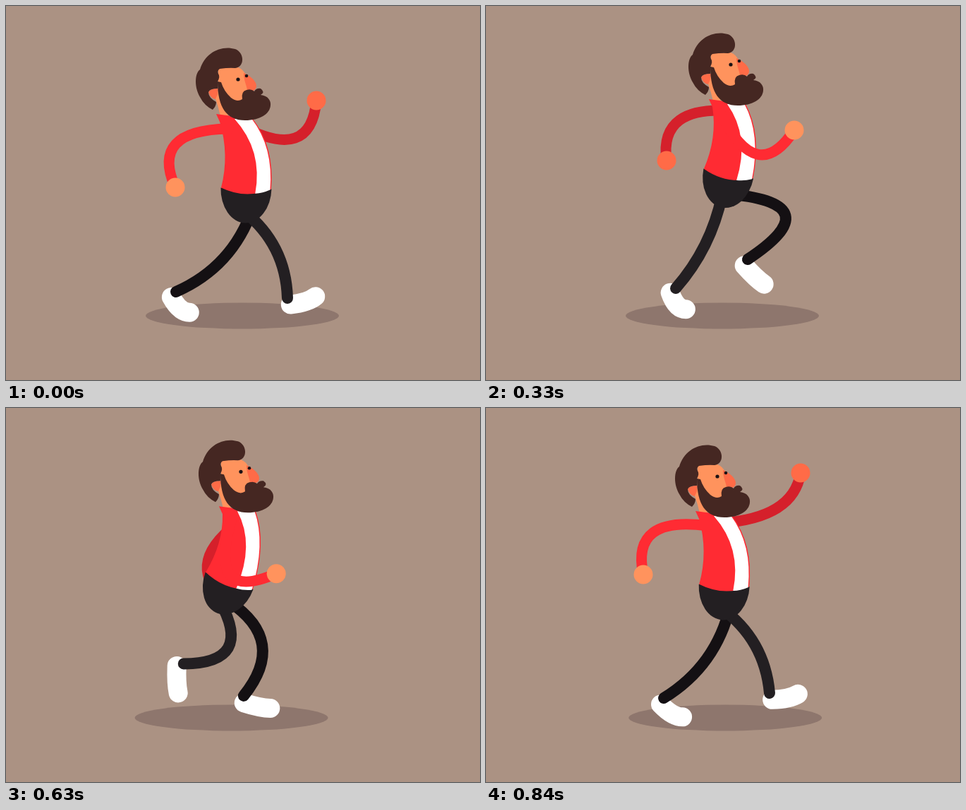
These frames come from a looping animation (672 px wide and 530 px high, 870 ms). An HTML page with a canvas:

```html
<!DOCTYPE html>
<html lang="en">
<head>
<meta charset="utf-8">
<title>Walk cycle</title>
<style>
html, body { margin: 0; width: 672px; height: 530px; overflow: hidden; background: #ab9283; }
canvas { display: block; }
</style>
</head>
<body>
<canvas id="stage" width="672" height="530"></canvas>
<script>
const ctx = document.getElementById('stage').getContext('2d');
const LOOP = 870, STEP = 30, TAU = Math.PI * 2;
const RED = '#ff2b33', DARK_RED = '#d5202b', SKIN = '#ff935d', DARK_SKIN = '#ff6b47';
const PANTS = '#231f22', DARK_PANTS = '#141013', HAIR = '#452722', EYE = '#1c1214';

// Only head, hands and ankles are keyed; spine, joints, shoes and shadow follow from them.
const POSES = [
  { time: 0, head: [329, 104], nearHand: [240, 257], farHand: [440, 134], nearFoot: [399, 414], farFoot: [241, 405] },
  { time: 210, head: [344, 93], nearHand: [403, 283], farHand: [315, 258], nearFoot: [344, 419], farFoot: [268, 361] },
  { time: 330, head: [347, 83], nearHand: [437, 176], farHand: [256, 219], nearFoot: [269, 400], farFoot: [371, 359] },
  { time: 450, head: [320, 102], nearHand: [419, 145], farHand: [221, 220], nearFoot: [247, 401], farFoot: [423, 417] },
  { time: 570, head: [333, 116], nearHand: [405, 187], farHand: [256, 274], nearFoot: [224, 392], farFoot: [367, 409] },
  { time: 690, head: [331, 65], nearHand: [351, 275], farHand: [368, 247], nearFoot: [293, 339], farFoot: [308, 408] },
  { time: 840, head: [328, 97], nearHand: [223, 236], farHand: [446, 92], nearFoot: [402, 404], farFoot: [252, 411] }
];

// Head shapes are placed around the near eye.
const NECK = new Path2D('M-33 24L-26 14L-12 58L-25 52L-28 40Z');
const FACE = [
  [SKIN, 'M-28-16L0-17Q8-14 11-6L14 20L4 32L-20 25L-28 3Z'],
  [DARK_SKIN, 'M-42 18Q-40 13-28 13L-29 21L-32 28Q-39 27-42 18Z'],
  [DARK_SKIN, 'M8-9C16-6 26 2 26 9C26 17 17 18 13 15C12 8 8 1 8-9Z'],
  [HAIR, 'M-26-15Q-12-17-4-16C10-18 9-38-4-43C-24-49-47-38-54-14C-62-8-62 12-54 25Q-48 37-36 43Q-31 38-31 32Q-42 26-42 18Q-40 13-29 13L-29 3Q-25-4-28-8Q-30-12-26-15Z'],
  [HAIR, 'M-29 3L-24 4Q-20 17-10 26Q-1 33 6 28Q4 17 12 15Q19 13 23 17Q26 12 32 13Q39 18 32 22C43 23 47 31 46 37C45 49 31 58 10 58C-16 58-29 40-29 3Z']
].map(([color, d]) => [color, new Path2D(d)]);

const clamp = (v, lo, hi) => Math.min(hi, Math.max(lo, v));
const add = (p, x, y) => [p[0] + x, p[1] + y];
const turn = ([x, y], a) => [x * Math.cos(a) - y * Math.sin(a), x * Math.sin(a) + y * Math.cos(a)];

// Smooth periodic curve through the key poses.
function sample(part, t) {
  const pose = i => POSES[(i + POSES.length) % POSES.length];
  const span = i => (pose(i + 1).time - pose(i).time + LOOP) % LOOP;
  const k = POSES.findLastIndex(p => p.time <= t);
  const h = span(k), u = (t - pose(k).time) / h;
  return [0, 1].map(axis => {
    const value = i => pose(i)[part][axis];
    const slope = i => (value(i + 1) - value(i)) / span(i);
    const tangent = i => (slope(i - 1) * span(i) + slope(i) * span(i - 1)) / (span(i) + span(i - 1));
    return value(k) + (value(k + 1) - value(k)) * u * u * (3 - 2 * u) +
      h * u * (1 - u) * ((1 - u) * tangent(k) - u * tangent(k + 1));
  });
}

function place([x, y], angle, paint) {
  ctx.save();
  ctx.translate(x, y);
  ctx.rotate(angle);
  paint();
  ctx.restore();
}

function ellipse(x, y, rx, ry, color, end = TAU) {
  ctx.fillStyle = color;
  ctx.beginPath();
  ctx.ellipse(x, y, rx, ry, 0, 0, end);
  ctx.fill();
}

function tube(from, control, to, width, color) {
  ctx.strokeStyle = color;
  ctx.lineWidth = width;
  ctx.lineCap = 'round';
  ctx.beginPath();
  ctx.moveTo(...from);
  ctx.quadraticCurveTo(...control, ...to);
  ctx.stroke();
}

// The closer its ends, the more a limb bends; side picks elbow or knee direction.
function limb(from, to, length, side, skew, width, color) {
  const dx = to[0] - from[0], dy = to[1] - from[1], chord = Math.hypot(dx, dy);
  const bend = 1.5 * side * Math.max(0, length - chord) / chord;
  const along = 0.5 + 2 * skew;
  tube(from, add(from, dx * along - dy * bend, dy * along + dx * bend), to, width, color);
}

function arm(shoulder, hand, sleeve, skin) {
  limb(shoulder, hand, 166, 1, 0.09, 15, sleeve);
  ellipse(...hand, 13.5, 13.5, skin);
}

// A trailing or raised foot points down, a leading one points up; toes stay flat on the ground.
function shoe(ankle, lead) {
  const [, y] = ankle;
  const limit = Math.asin(clamp((427 - y) / 30, 0, 1));
  const wanted = (6 - lead / 2 + (419 - y) * 0.7) * TAU / 360;
  const pitch = y > 375 ? Math.min(wanted, limit) : wanted;
  const lifted = clamp((385 - y) / 20, 0, 1);
  const toePitch = pitch < 0 ? 2 * pitch : pitch * lifted;
  const heel = add(ankle, ...turn([1, 10], pitch));
  const ball = add(heel, ...turn([24, 6], pitch));
  const toe = add(ball, ...turn([14, 0], toePitch));
  tube(heel, ball, toe, 27, '#fff');
}

function leg(hip, start, ankle, length, color) {
  shoe(ankle, ankle[0] - hip[0]);
  limb(start, ankle, length, -1, 0, 16, color);
}

// Edge between two points, bulging away from the straight line.
function edge([x0, y0], [x1, y1], dx, dy) {
  ctx.quadraticCurveTo((x0 + x1) / 2 + dx, (y0 + y1) / 2 + dy, x1, y1);
}

function torso(head, onHip) {
  const collar = add(head, -26, 60), chest = add(head, 21, 56), lapel = add(head, -5, 56);
  const left = onHip(-35.5, 0), right = onHip(35.5, 0), hem = onHip(13, 7);

  ctx.fillStyle = RED;
  ctx.beginPath();
  ctx.moveTo(...add(head, -31, 49));
  ctx.lineTo(...collar);
  edge(collar, left, 13, 0);
  ctx.quadraticCurveTo(...onHip(0, 16), ...right);
  edge(right, chest, 18, -10);
  ctx.fill();

  const inner = add(chest, -1.5, 0), corner = add(right, -1.5, 1);
  ctx.fillStyle = '#fff';
  ctx.beginPath();
  ctx.moveTo(...lapel);
  edge(lapel, hem, 26, -8);
  edge(hem, corner, 0, 2);
  edge(corner, inner, 18, -10);
  ctx.fill();
}

function draw(t) {
  const head = sample('head', t);
  const nearFoot = sample('nearFoot', t), farFoot = sample('farFoot', t);
  // The body leans twice per loop, and the hips tilt against the lean.
  const lean = -3 + 14.5 * Math.cos(TAU * 2 * (t - 5) / LOOP);
  const tilt = (9 - 0.65 * lean) * TAU / 360;
  const hip = add(head, lean, 154.5);
  const onHip = (x, y) => add(hip, ...turn([x, y], tilt));

  ctx.fillStyle = '#ab9283';
  ctx.fillRect(0, 0, 672, 530);
  ellipse(143 + 0.3 * (nearFoot[0] + farFoot[0]), 439, 137, 18.5, '#8e766d');

  arm(add(head, 5, 66), sample('farHand', t), DARK_RED, DARK_SKIN);
  leg(hip, onHip(10, 28), farFoot, 184, DARK_PANTS);
  leg(hip, onHip(-3, 32), nearFoot, 160, PANTS);
  place(hip, tilt, () => ellipse(0, 0, 36, 49, PANTS, Math.PI));

  ctx.fillStyle = SKIN;
  place(head, 0, () => ctx.fill(NECK));
  torso(head, onHip);
  place(head, 0, () => {
    for (const [color, path] of FACE) {
      ctx.fillStyle = color;
      ctx.fill(path);
    }
    ellipse(0, 0, 2.6, 2.6, EYE);
    ellipse(12, -5, 2.3, 2.3, EYE);
  });
  arm(add(head, -14, 70), sample('nearHand', t), RED, SKIN);
}

function tick() {
  draw(Math.floor(performance.now() % LOOP / STEP) * STEP);
  requestAnimationFrame(tick);
}
tick();
</script>
</body>
</html>
```
